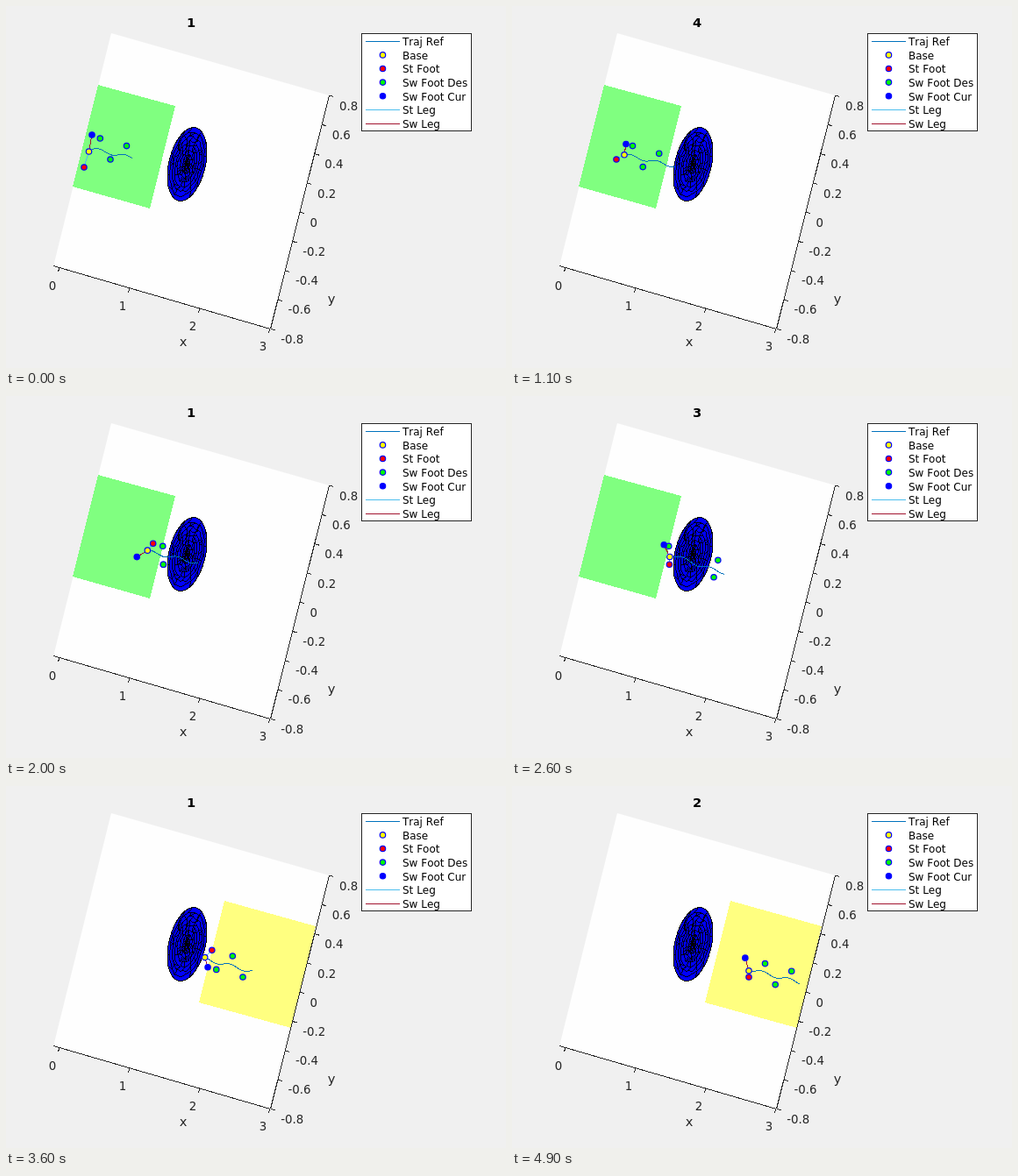
An HTML page for the animation above (5 s loop, 570 by 413 pixels).

```html
<!DOCTYPE html>
<html>
<head>
<meta charset="utf-8">
<style>
html, body { margin: 0; width: 100%; height: 100%; overflow: hidden; background: #f0f0f0; }
svg { display: block; width: 570px; height: 413px; font-family: "DejaVu Sans", sans-serif; font-kerning: none; }
.crisp { shape-rendering: crispEdges; }
</style>
</head>
<body>
<svg id="stage" viewBox="0 0 570 413"></svg>
<script>
const stage = document.getElementById('stage');
const INK = '#262626', TRAJ = '#0072bd', STANCE = '#4dbeee', SWING = '#a2142f';
const FRAME_MS = 100, FRAMES = 50, STEP = 4;
const TAU = 2 * Math.PI;

function set(el, attrs) {
  for (const key in attrs) el.setAttribute(key, attrs[key]);
}
function add(tag, attrs, text) {
  const el = document.createElementNS('http://www.w3.org/2000/svg', tag);
  set(el, attrs);
  if (text !== undefined) el.textContent = text;
  stage.appendChild(el);
  return el;
}
function line(a, b, stroke) {
  return add('line', { x1: a[0], y1: a[1], x2: b[0], y2: b[1], stroke, class: 'crisp' });
}
function label(x, y, text, size = 13.33, anchor = 'start', fill = INK) {
  return add('text', { x, y, 'font-size': size, 'text-anchor': anchor, fill }, text);
}
function dot(fill, cx = 0, cy = 0) {
  return add('circle', { cx, cy, r: 3.2, fill, stroke: '#00f', 'stroke-width': 1.2 });
}

// Plot area and terrain
add('polygon', { points: '120,31 368.5,102 301.5,369 54,297', fill: '#fefefe' });
const terrain = add('polygon', { class: 'crisp' });
const GREEN = { points: '105,90 193,114 164,231 76,206', fill: '#80ff80' };
const YELLOW = { points: '249,131 353,160 325,276 220,247', fill: '#ffff80' };

// Round obstacle: a disc under a jittered mesh of rings and spokes
function drawObstacle() {
  const RINGS = 8, SPOKES = 32, RADIUS = 0.25;
  let seed = 17;
  const rand = () => (seed = (seed * 16807) % 2147483647) / 2147483647;
  const node = (ring, spoke) => {
    const jitter = ring < RINGS ? rand() - 0.5 : 0;
    const r = RADIUS * (ring + jitter * 0.5) / RINGS, a = (spoke + jitter) * TAU / SPOKES;
    const u = r * Math.cos(a), v = r * Math.sin(a);
    return [206.5 + 80 * u + 41.4 * v, 180.5 + 23.4 * u - 166.8 * v];
  };
  const mesh = Array.from({ length: RINGS + 1 }, (_, i) =>
    Array.from({ length: SPOKES }, (_, j) => node(i, j)));
  add('polygon', { points: mesh[RINGS].join(' '), fill: '#00f', stroke: '#000', class: 'crisp' });

  let d = '';
  for (let i = 1; i <= RINGS; i++) {
    for (let j = 0; j < SPOKES; j++) {
      const next = (j + 1) % SPOKES;
      d += `M${mesh[i][j]}L${mesh[i][next]}`;
      if (rand() < 0.6) d += `M${mesh[i][j]}L${mesh[i - 1][rand() < 0.5 ? j : next]}`;
    }
  }
  add('path', { d, stroke: '#000', 'stroke-width': 0.9, fill: 'none', class: 'crisp' });
}
drawObstacle();

// Axes
line([54, 296.5], [301.5, 368.5], INK);
line([301.5, 368.5], [368.5, 102], INK);
for (let i = 0; i < 4; i++) {
  const x = 60.8 + 80 * i, y = 298.5 + 23.3 * i;
  line([x, y], [x - 1.3, y + 5], INK);
  label(53 + 80 * i, 324 + 23 * i, i, 13.33, 'middle');
}
for (let i = 0; i < 9; i++) {
  const x = 368.5 - 8.35 * i, y = 102 + 33.3 * i;
  line([x, y], [x + 5, y + 1.5], INK);
  label(380 - 8.35 * i, 119 + 33.2 * i, (8 - 2 * i) / 10);
}
label(202, 388, 'x', 14.67, 'middle');
label(371, 339, 'y', 14.67, 'middle');
const title = label(211, 24, '1', 14.67, 'middle', '#000');
set(title, { 'font-weight': 'bold' });

// Legend
add('rect', { x: 405.5, y: 31.5, width: 125, height: 111, fill: '#fff', stroke: INK, class: 'crisp' });
[
  ['Traj Ref', TRAJ, true], ['Base', '#ff0'], ['St Foot', '#f00'], ['Sw Foot Des', '#0f0'],
  ['Sw Foot Cur', '#00f'], ['St Leg', STANCE, true], ['Sw Leg', SWING, true]
].forEach(([name, color, isLine], i) => {
  const y = 40.5 + 15.6 * i, mid = Math.floor(y) + 0.5;
  if (isLine) line([410, mid], [449, mid], color);
  else dot(color, 429.5, y - 0.2);
  label(452, Math.round(y + 4.7), name, 12, 'start', '#000');
});

// Footholds alternate left and right; those over the gap move to its nearer edge
const GAP = 60, MARGIN = 8;
function foot(i) {
  if (i < 2) return i ? [89, 184] : [98, 147];
  const k = Math.floor(i / 2) - 1, right = i % 2;
  const x = (right ? 119 : 107.3) + 30.2 * k;
  const y = (right ? 175 : 151) + 8.6 * k;
  const depth = x - 193 + 0.248 * (y - 114);
  if (depth < MARGIN || depth > GAP) return [x, y];
  const shift = ((depth < GAP / 2 ? 0 : GAP) - depth) / 1.07;
  return [x + shift, y + 0.29 * shift];
}

// Body height over distance: a swaying line that shifts sideways at the gap once replanned
function pathY(x, replanned) {
  const before = 166.4 + 0.227 * (x - 113), after = 207 + 0.267 * (x - 263);
  const blend = replanned ? Math.min(1, Math.max(0, (x - 188) / 30)) : 0;
  const sway = 1.9 * Math.sin(TAU * (x - 113) / 30);
  const launch = 3 * Math.exp((94 - x) / 3);
  return before + (after - before) * blend + sway + launch;
}

// Steady pace, with a soft start and a lag and catch-up across the gap
const cruise = n => 86.25 + 3.75 * n;
function bodyX(n) {
  const crossing = n > 24 && n < 40 ? 5.5 * Math.sin(TAU * (n - 32) / 16) : 0;
  return cruise(n) + 8.25 * Math.exp(-n / 4) + crossing;
}

const traj = add('path', { stroke: TRAJ, fill: 'none', class: 'crisp' });
const stLeg = line([0, 0], [0, 0], STANCE);
const swLeg = line([0, 0], [0, 0], SWING);
const base = dot('#ff0');
const stFoot = dot('#f00');
const goals = [dot('#0f0'), dot('#0f0'), dot('#0f0')];
const swFoot = dot('#00f');

const move = (el, [cx, cy]) => set(el, { cx, cy });
const link = (el, a, b) => set(el, { x1: a[0], y1: a[1], x2: b[0], y2: b[1] });

function draw(n) {
  const step = Math.floor(n / STEP), phase = n % STEP / STEP;
  const replanned = step > 5;
  const at = x => [x, pathY(x, replanned)];
  const body = at(bodyX(n)), end = cruise(n) + 60;
  const from = foot(step), stance = foot(step + 1), to = foot(step + 2);
  const swing = from.map((v, i) => v + (to[i] - v) * phase);

  const points = [];
  for (let x = body[0]; x < end; x += 2) points.push(at(x));
  set(traj, { d: 'M' + points.join('L') });
  link(stLeg, body, stance);
  link(swLeg, body, swing);
  move(base, body);
  move(stFoot, stance);
  move(swFoot, swing);
  // The far side of the gap is planned only after the replan
  goals.forEach((goal, i) => {
    const next = foot(step + 2 + i);
    move(goal, !replanned && next[0] > 200 ? to : next);
  });
  set(terrain, step < 7 ? GREEN : YELLOW);
  title.textContent = n % STEP + 1;
}

const t0 = performance.now();
function tick() {
  const t = Math.max(0, performance.now() - t0);
  draw(Math.floor(t / FRAME_MS) % FRAMES);
  requestAnimationFrame(tick);
}
tick();
</script>
</body>
</html>
```
